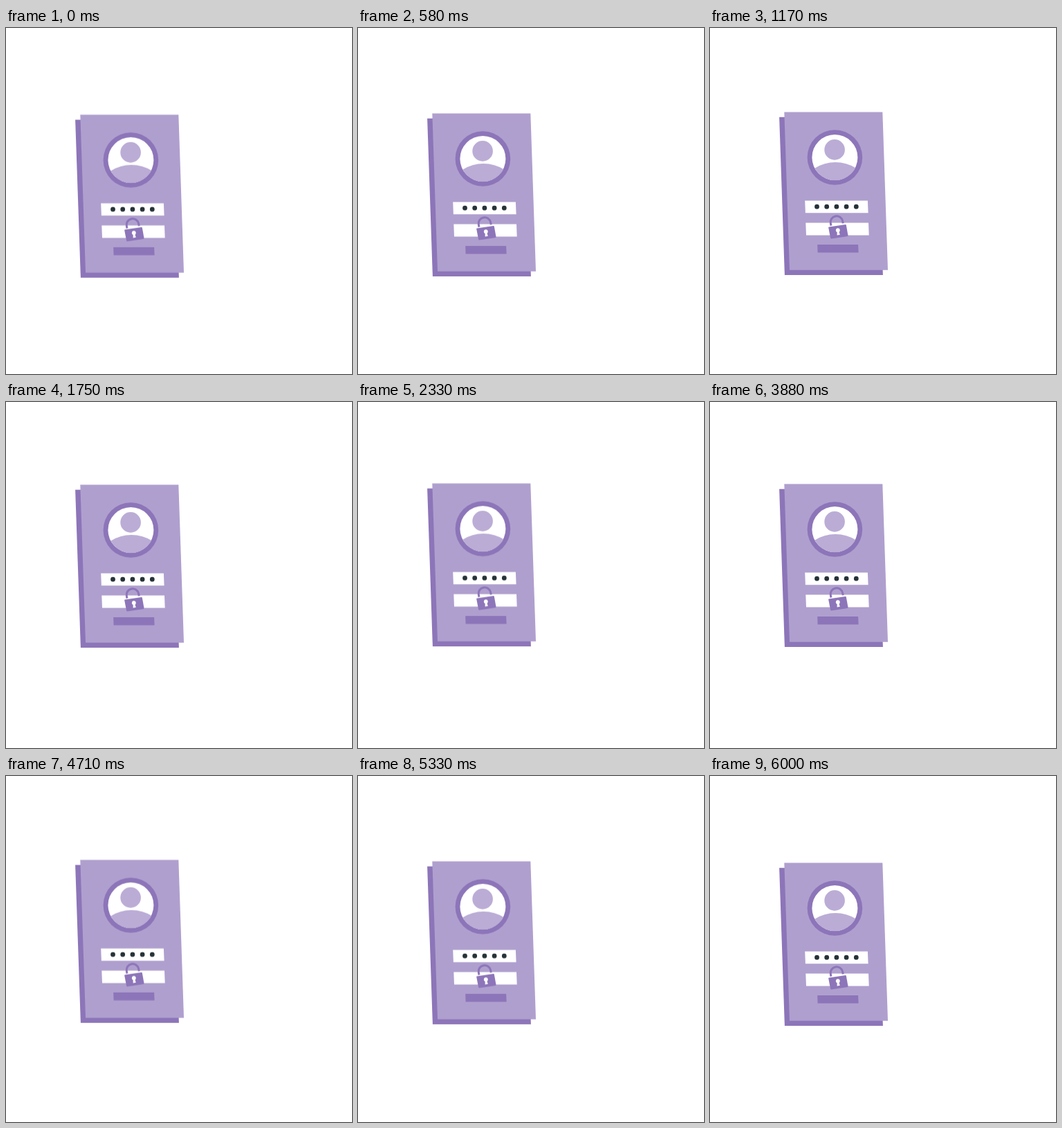
An HTML page for the animation above (6.04 s loop, 500 px wide and 500 px high).

```html
<!DOCTYPE html>
<html lang="en">
<head>
<meta charset="utf-8">
<title>Floating login card</title>
<style>
  html, body { margin: 0; width: 100%; height: 100%; overflow: hidden; background: #fff; }
  svg { display: block; width: 100%; height: 100%; }
  .card { animation: float 6040ms linear infinite; }
  .main { fill: #8d75b9; }
  .face { fill: #af9fce; }
  .tint { fill: #bbacd6; }
  .white { fill: #fff; }
  .dots { stroke: #263238; stroke-width: 6.8; stroke-linecap: round; stroke-dasharray: 0 14.2; }
  .shackle { fill: none; stroke: #8d75b9; stroke-width: 3; }
  @keyframes float {
    0%, 100% { transform: translateY(-.15px); }
    49.3% { transform: translateY(-10px); }
    99.3% { transform: translateY(0); }
  }
</style>
</head>
<body>
<svg viewBox="0 0 500 500">
  <clipPath id="portrait"><circle cx="180.4" cy="191" r="33.5"/></clipPath>
  <g class="card">
    <path class="main" d="M100.1 132.8H242.2L249.9 361.1H107.9Z"/>
    <path class="face" d="M107.3 125.5H249.3L257 353.8H115Z"/>

    <!-- Avatar -->
    <circle class="main" cx="180.4" cy="191" r="39.8"/>
    <circle class="white" cx="180.4" cy="191" r="33"/>
    <circle class="tint" cx="180.1" cy="179.9" r="14.8"/>
    <g clip-path="url(#portrait)">
      <path class="tint" d="M151.3 206.8A56 56 0 0 1 211.3 206.8L205 213.5A33 33 0 0 1 156.5 213.8Z"/>
    </g>

    <!-- Fields and button -->
    <path class="white" d="M137.2 253.4H227.9L228.6 271.3H137.9Z"/>
    <path class="dots" d="M154.5 262.2H211.4"/>
    <path class="white" d="M138.3 285.5H229L229.7 303.4H139Z"/>
    <path class="main" d="M155.2 316.9H214.1L214.6 328.6H155.6Z"/>

    <!-- Padlock -->
    <path class="shackle" d="M175 289.6L174.3 286.3A8.8 8.8 0 0 1 191.6 282.9L192.3 286.3"/>
    <path class="main" d="M172 291.5L195.7 288Q196.6 287.9 196.8 288.8L199.5 303.8Q199.6 304.8 198.7 305L175.3 308.4Q174.3 308.5 174.1 307.6L171.2 292.6Q171.1 291.7 172 291.5Z"/>
    <circle class="white" cx="184.8" cy="296.2" r="2.9"/>
    <path class="white" d="M183.7 297.5L186 297.2L187.8 302.7L183.6 303.4Z"/>
  </g>
</svg>
</body>
</html>
```
